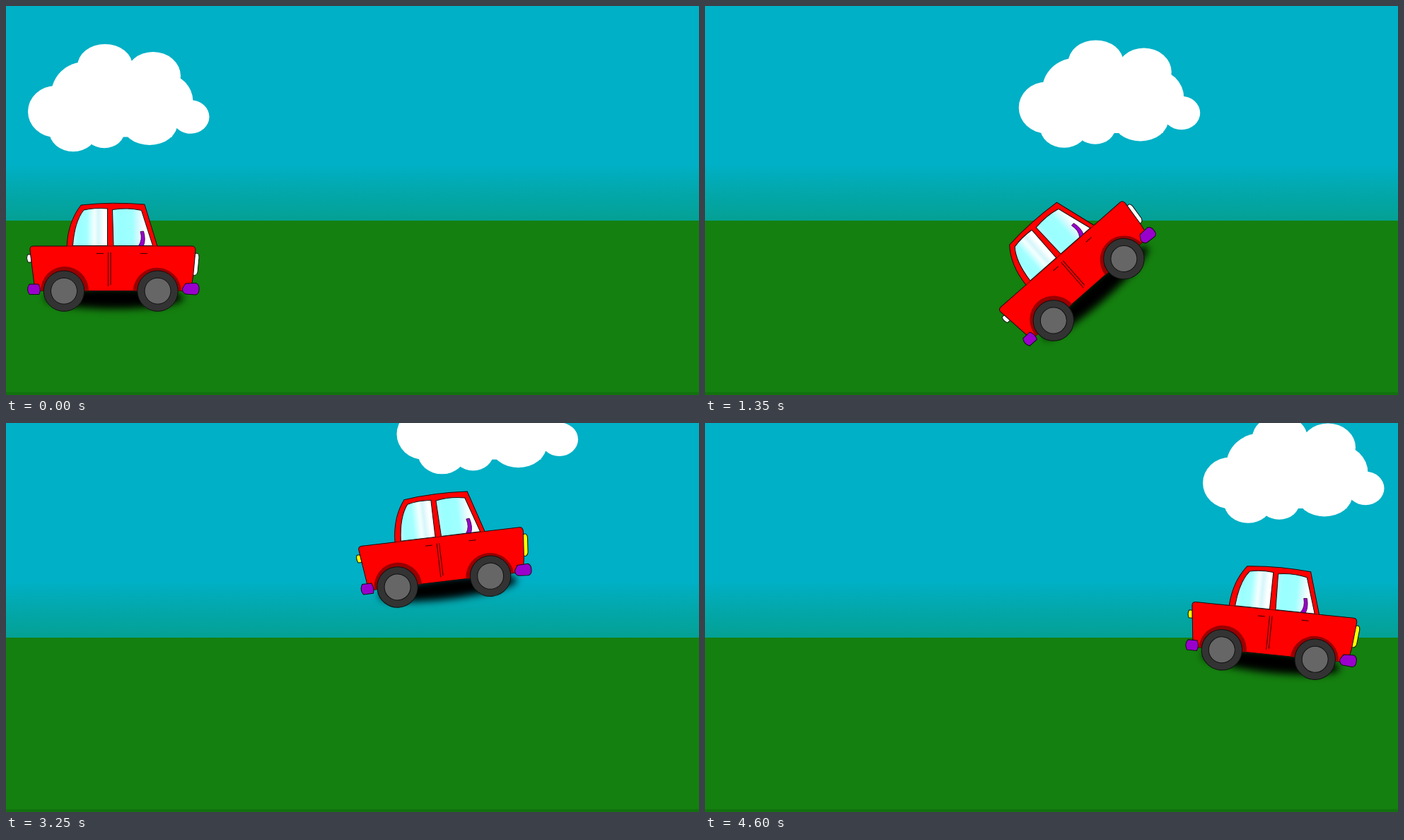
An HTML page that plays this animation: 980x551 px, repeating every 4.65 s.

```html
<!DOCTYPE html>
<html lang="en">
<head>
<meta charset="utf-8">
<title>Car and cloud</title>
<style>
html, body { margin: 0; width: 100%; height: 100%; overflow: hidden; background: #00b0c6; }
svg { display: block; width: 100%; height: 100%; }
.line { fill: none; stroke: #300; stroke-width: 1; }
.edge { stroke: #111; stroke-width: 1; }
</style>
</head>
<body>
<svg viewBox="0 0 980 551">
  <defs>
    <linearGradient id="sky" x1="0" y1="0" x2="0" y2="304" gradientUnits="userSpaceOnUse">
      <stop offset="0.74" stop-color="#00b0c6"/>
      <stop offset="0.84" stop-color="#02a9b0"/>
      <stop offset="1" stop-color="#04a094"/>
    </linearGradient>
    <linearGradient id="rearGlass">
      <stop offset="0" stop-color="#c8ffff"/>
      <stop offset="0.15" stop-color="#99ffff"/>
      <stop offset="0.4" stop-color="#a4ffff"/>
      <stop offset="0.62" stop-color="#f4ffff"/>
      <stop offset="0.74" stop-color="#d6f6fa"/>
      <stop offset="0.9" stop-color="#fff"/>
    </linearGradient>
    <linearGradient id="frontGlass">
      <stop offset="0" stop-color="#b4fbff"/>
      <stop offset="0.15" stop-color="#99ffff"/>
      <stop offset="0.5" stop-color="#a0ffff"/>
      <stop offset="0.64" stop-color="#d4faff"/>
      <stop offset="0.8" stop-color="#fff"/>
    </linearGradient>
    <filter id="blur" x="-20%" y="-80%" width="140%" height="260%"><feGaussianBlur stdDeviation="5.5"/></filter>
    <g id="wheel">
      <circle r="28.7" fill="#333" class="edge"/>
      <circle r="18.5" fill="#666" class="edge"/>
    </g>
  </defs>

  <rect width="980" height="305" fill="url(#sky)"/>
  <rect y="304" width="980" height="247" fill="#14800f"/>
  <rect y="547" width="980" height="4" fill="#11720e"/>

  <g id="cloud" fill="#fff">
    <ellipse cx="70" cy="149.5" rx="39" ry="36.5"/>
    <ellipse cx="112" cy="125" rx="48" ry="46"/>
    <ellipse cx="140" cy="85" rx="39" ry="31"/>
    <ellipse cx="208" cy="99" rx="39" ry="34"/>
    <ellipse cx="222" cy="135" rx="42.5" ry="40"/>
    <ellipse cx="261" cy="157" rx="26.5" ry="23.8"/>
    <ellipse cx="203" cy="165" rx="40" ry="32"/>
    <ellipse cx="139" cy="176" rx="29" ry="25.3"/>
    <ellipse cx="95" cy="177" rx="34" ry="29.2"/>
    <rect x="85" y="95" width="150" height="90.5"/>
  </g>

  <g id="car">
    <ellipse cx="153" cy="413.5" rx="98" ry="15.5" filter="url(#blur)"/>
    <g class="lamp edge" fill="#fff">
      <path d="M35 352H30.5Q28 357 31 363H36Z"/>
      <path d="M267 351Q273 348 273 356L271 377Q269 383 264 381Z"/>
    </g>
    <path class="edge" fill="#f00" d="M34 346Q33 340 39 340H86C87 318 94 297 106 282Q150 277 196 281L214 340H263Q268 340 268 346L264.5 384 261 403.5H41Z"/>
    <path class="line" d="M86 340H214" opacity=".6"/>
    <path class="edge" fill="url(#rearGlass)" d="M94.5 339.5C96 318 101 300 110 289Q125 285.5 143.5 287V339.5Z"/>
    <path class="edge" fill="url(#frontGlass)" d="M150.500 288.500Q172 285 191.500 289.500L207.500 339.500H152Z"/>
    <path fill="#90c" stroke="#303" stroke-width=".8" d="M190 319.500L194.500 319Q198 331 194.500 339.500H187.500Q193.500 331 190 319.500Z"/>
    <path class="line" d="M144.500 349V397M148 349V395M128 350.500H138M190 350.500H200"/>
    <g fill="#900">
      <path d="M49 403.500A34 34.500 0 0 1 117 403.500Z"/>
      <path d="M179.500 403.500A34.300 34.500 0 0 1 248 403.500Z"/>
    </g>
    <g class="edge" fill="#90c">
      <path d="M33 394H46Q50 401 47 408.500H33Q28 401 33 394Z"/>
      <path d="M254 393L269 392.500Q274 395 273 402 273 408 268 409L254 408Q249 406 249.500 400Z"/>
    </g>
    <use href="#wheel" x="82" y="403.700"/>
    <use href="#wheel" x="214.500" y="403.700"/>
  </g>
</svg>
<script>
const LOOP = 4650, STEP = 50, LAMPS_ON = 1700;
const PIVOT = [148, 403.5];

// time, x, y, angle of the point midway between the wheels
const carKeys = [
  [0, 148, 403.5, 0], [550, 280, 418, -17.8], [650, 302, 420.5, -20.8],
  [1100, 474, 409, -34], [1350, 542.3, 401.8, -41.3], [1650, 545, 404, -46],
  [2050, 559.3, 340, -44.5], [2200, 558, 310, -42], [2750, 554.5, 252.5, -31],
  [2850, 557.3, 244.8, -28], [3300, 628, 224, -4], [3650, 693, 243, 15.7],
  [3850, 715, 268, 12], [4400, 796.5, 327.8, 5.8], [4650, 796.5, 327.8, 5.8]
];

// time, x shift, y shift
const cloudKeys = [
  [0, 0, 0], [550, 141, 2], [650, 170, 2], [1050, 302, -23], [1350, 412.7, -5.5],
  [1650, 434, -38], [2050, 448, -77], [2200, 451, -89], [2750, 463, -122],
  [2850, 468.5, -126], [3300, 528, -134], [3650, 567.5, -111.5],
  [3850, 608, -97], [4400, 673, -64.5], [4650, 673, -64.5]
];

// Hermite curve through the keys, without overshoot
function sample(keys, t, c) {
  const secant = i => (keys[i + 1][c] - keys[i][c]) / (keys[i + 1][0] - keys[i][0]);
  const slope = i => {
    if (i === 0) return secant(0);
    if (i === keys.length - 1) return secant(i - 1);
    const a = secant(i - 1), b = secant(i);
    return a * b > 0 ? 2 * a * b / (a + b) : 0;
  };
  let i = 0;
  while (i < keys.length - 2 && t >= keys[i + 1][0]) i++;
  const h = keys[i + 1][0] - keys[i][0], u = (t - keys[i][0]) / h, v = 1 - u;
  return v * v * ((1 + 2 * u) * keys[i][c] + u * h * slope(i)) +
    u * u * ((3 - 2 * u) * keys[i + 1][c] - v * h * slope(i + 1));
}

const car = document.getElementById("car");
const cloud = document.getElementById("cloud");
const lamp = car.querySelector(".lamp");

function draw(t) {
  const [x, y, angle] = [1, 2, 3].map(c => sample(carKeys, t, c));
  const [dx, dy] = [1, 2].map(c => sample(cloudKeys, t, c));
  car.setAttribute("transform", `translate(${x} ${y}) rotate(${angle}) translate(${-PIVOT[0]} ${-PIVOT[1]})`);
  cloud.setAttribute("transform", `translate(${dx} ${dy})`);
  lamp.setAttribute("fill", t < LAMPS_ON ? "#fff" : "#ff0");
}

let start;
function tick(now) {
  start ??= now;
  draw(Math.floor(((now - start) % LOOP) / STEP) * STEP);
  requestAnimationFrame(tick);
}
draw(0);
requestAnimationFrame(tick);
</script>
</body>
</html>
```
